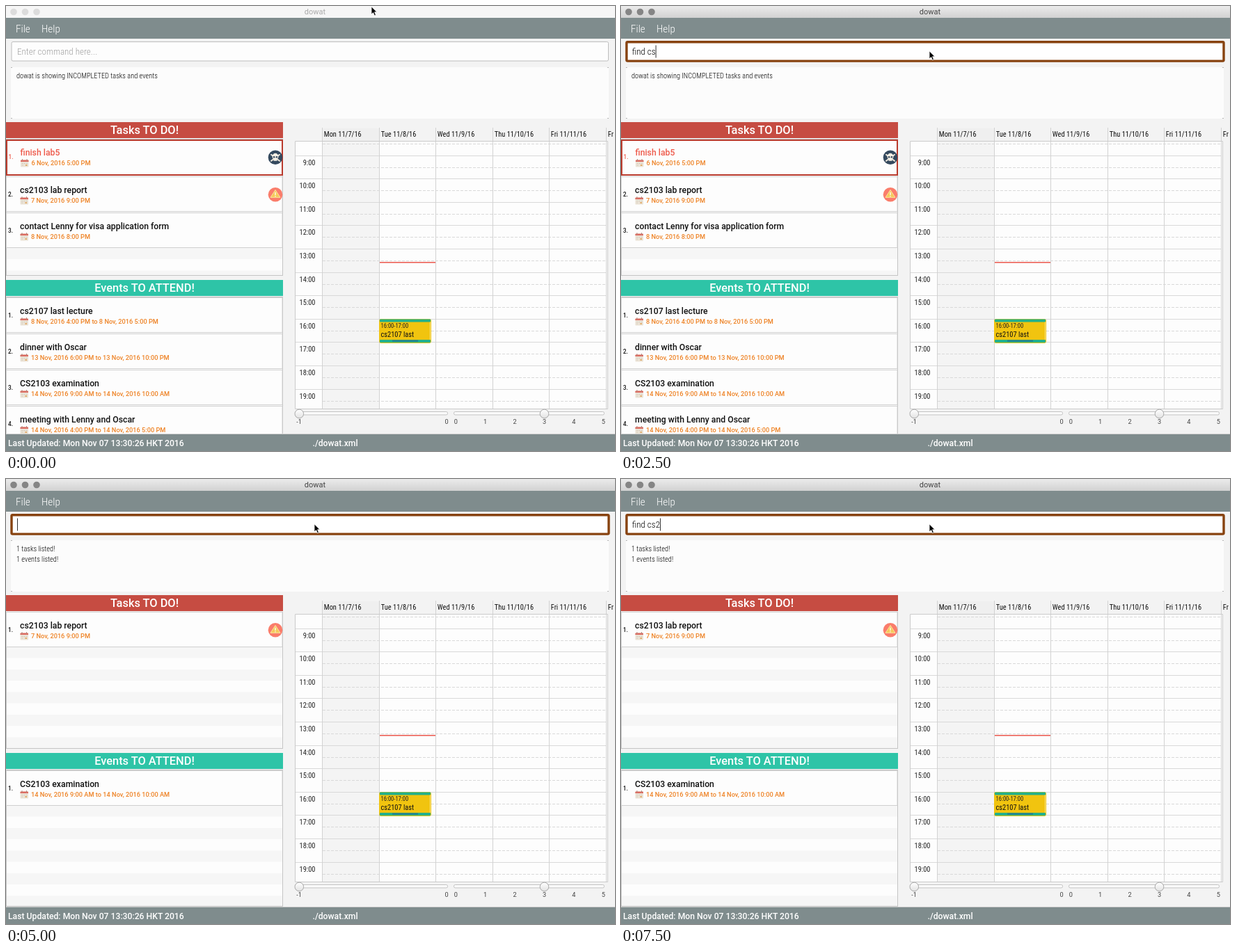
Write an HTML page that moves like this. It is 875 by 640 pixels and loops after 8000 ms.

```html
<!DOCTYPE html>
<html lang="en">
<head>
<meta charset="utf-8">
<title>dowat</title>
<style>
html, body { margin: 0; width: 100%; height: 100%; overflow: hidden; background: #f3f3f3; }
svg { display: block; width: 875px; height: 640px; }
text { font-family: Roboto, "Liberation Sans", sans-serif; white-space: pre; }
.cond, .dark { font-family: "Roboto Condensed", Roboto, "Liberation Sans", sans-serif; font-stretch: 75%; }
.cond { font-weight: 300; }
.med { font-weight: 500; }
</style>
</head>
<body>
<svg id="stage" viewBox="0 0 875 640">
  <defs>
    <linearGradient id="bar" x2="0" y2="1"><stop stop-color="#ebebeb"/><stop offset="1" stop-color="#d2d2d2"/></linearGradient>
    <linearGradient id="knob" x2="0" y2="1"><stop stop-color="#fff"/><stop offset="1" stop-color="#e2e2e2"/></linearGradient>
    <g id="date">
      <rect y="2" width="11.5" height="10" rx="1" fill="#ebe3d6"/>
      <path d="M0 4.5V3q0-1 1-1h9.5q1 0 1 1v1.500z" fill="#dd6a60"/>
      <path d="M2.5 .5v3M9 .5v3" stroke="#b08a80"/>
      <path d="M2 7h1.500M5 7h1.500M8 7h1.500M2 9.500h1.500" stroke="#cfc6b8"/>
      <path d="M7 9.500h2.500" stroke="#e0a860" stroke-width="1.800"/>
    </g>
    <g id="skull">
      <circle r="10.300" fill="#34495e"/>
      <path d="M-6-4 6 5M6-4-6 5" stroke="#eee8dc" stroke-width="2" stroke-linecap="round"/>
      <path d="M-4.500-1a4.500 5 0 0 1 9 0q0 2.500-2 3v3h-5v-3q-2-.5-2-3z" fill="#f3eee3"/>
      <circle cx="-1.900" cy="-.6" r="1.300" fill="#34495e"/><circle cx="1.900" cy="-.6" r="1.300" fill="#34495e"/>
    </g>
    <g id="warn">
      <circle r="10.300" fill="#fa7d6b"/>
      <path d="M0-6.800 7 4H-7z" fill="#f6c95a" stroke="#fbe3a0" stroke-linejoin="round"/>
      <path d="M0-3.500V.6M0 1.800V3" stroke="#fff" stroke-width="1.300"/>
    </g>
  </defs>
</svg>
<script>
const stage = document.getElementById('stage');

function add(tag, attrs, parent = stage, content) {
  const el = document.createElementNS('http://www.w3.org/2000/svg', tag);
  for (const k in attrs) el.setAttribute(k, attrs[k]);
  if (content !== undefined) el.textContent = content;
  parent.appendChild(el);
  return el;
}
const group = () => add('g', {});
const rect = (x, y, width, height, fill, more, parent) =>
  add('rect', { x, y, width, height, fill, ...more }, parent);
const line = (d, stroke, more, parent) => add('path', { d, stroke, fill: 'none', ...more }, parent);
const label = (s, x, y, size, fill, cls = 'med', more, parent) =>
  add('text', { x, y, 'font-size': size, fill, class: cls, ...more }, parent, s);
const mid = { 'text-anchor': 'middle' };
const end = { 'text-anchor': 'end' };
const show = (el, on) => el.setAttribute('visibility', on ? 'visible' : 'hidden');

// Window frame
rect(0, 0, 875, 640, '#f3f3f3');
const bar = rect(0, 0, 875, 17, '#f6f6f6');
const lights = [11, 27.5, 44].map(cx => add('circle', { cx, cy: 8.5, r: 4.8 }));
const title = label('dowat', 444, 12.3, 11, '#aaa', '', mid);
rect(0, 17, 875, 30, '#7f8c8d');
label('File', 14, 38, 15.2, '#fff', 'cond');
label('Help', 51, 38, 15.2, '#fff', 'cond');

// Command box
const idle = group();
rect(8, 51.5, 857.5, 27.5, '#fdfdfd', { rx: 2, stroke: '#bdbdbd' }, idle);
label('Enter command here...', 16, 70, 13.1, '#a0a0a0', 'cond', {}, idle);
const active = group();
rect(8, 51.7, 858, 27.4, '#fff', { rx: 1.5, stroke: '#87420f', 'stroke-width': 3.4 }, active);
const typed = label('', 16, 70, 13.1, '#000', 'cond', {}, active);
const caret = rect(16, 56.5, 1, 18, '#333', {}, active);

// Result box
rect(7, 88, 859, 74, '#fcfcfc');
line('M7 88.5h2M864 88.5h2M7 161.5h2M864 161.5h2', '#b5b5b5');

// Lists
function panel(top, bottom, head, color, name) {
  rect(0, head, 398, top - head - 2, color);
  label(name, 199, head + 17, 16.4, '#fff', 'med', mid);
  rect(.5, top - .5, 397, bottom - top, '#fdfdfd', { stroke: '#c4c4c4' });
}
panel(192, 388, 167, '#c64c42', 'Tasks TO DO!');
panel(419, 615, 394, '#2ec4a7', 'Events TO ATTEND!');

function stripes(parent, from, to) {
  for (let y = from; y < to; y += 32.5)
    rect(1, y, 396, Math.min(16, to - y), '#f6f6f6', {}, parent);
}
function row(parent, y, n, name, when, icon, late) {
  const ink = late ? '#ee5a4b' : '#111';
  const x = late ? .5 : 0;
  if (late) rect(1, y + 1, 396, 50, '#fdfdfd', { stroke: '#b93a2c', 'stroke-width': 2 }, parent);
  else rect(.5, y - .5, 396.5, 50, '#fdfdfd', { stroke: '#d0d0d0' }, parent);
  label(n + '.', 3 + x, y + 28.3, 8.2, ink, 'med', {}, parent);
  label(name, 20 + x, y + 22.7 + x, 12.25, ink, 'med', {}, parent);
  add('use', { href: '#date', x: 20.5 + x, y: y + 27.5 }, parent);
  label(when, 36 + x, y + 36.7 + x, 9.22, '#ee8224', 'med', {}, parent);
  if (icon) add('use', { href: icon, x: 387, y: y + 25.3 + x }, parent);
}

const full = group();
label('dowat is showing INCOMPLETED tasks and events', 15, 103.5, 10.37, '#000', 'cond', {}, full);
stripes(full, 348, 387);
row(full, 192, 1, 'finish lab5', '6 Nov, 2016 5:00 PM', '#skull', true);
row(full, 246, 2, 'cs2103 lab report', '7 Nov, 2016 9:00 PM', '#warn');
row(full, 298, 3, 'contact Lenny for visa application form', '8 Nov, 2016 8:00 PM');
[['cs2107 last lecture', '8 Nov, 2016 4:00 PM to 8 Nov, 2016 5:00 PM'],
 ['dinner with Oscar', '13 Nov, 2016 6:00 PM to 13 Nov, 2016 10:00 PM'],
 ['CS2103 examination', '14 Nov, 2016 9:00 AM to 14 Nov, 2016 10:00 AM'],
 ['meeting with Lenny and Oscar', '14 Nov, 2016 4:00 PM to 14 Nov, 2016 5:00 PM']
].forEach(([name, when], i) => row(full, 420 + i * 52, i + 1, name, when));

const found = group();
label('1 tasks listed!', 15, 103.5, 10.37, '#000', 'cond', {}, found);
label('1 events listed!', 15, 119, 10.37, '#000', 'cond', {}, found);
stripes(found, 241.5, 387);
stripes(found, 469.5, 614);
row(found, 192, 1, 'cs2103 lab report', '7 Nov, 2016 9:00 PM', '#warn');
row(found, 420, 1, 'CS2103 examination', '14 Nov, 2016 9:00 AM to 14 Nov, 2016 10:00 AM');

// Calendar
const col = i => 454.5 + Math.round(i * 81.6);
rect(415, 194, 449, 385, '#fdfdfd');
rect(455, 194, 81, 385, '#f4f4f4');
rect(455, 176, 81, 18, '#efefef');
for (let h = 8; h < 20; h++) {
  const y = Math.round(215.5 + (h - 9) * 33.6) - .5;
  if (h > 8) {
    line(`M415 ${y}H863`, '#d9d9d9');
    label(h + ':00', 444.5, y + 13, 10.4, '#222', 'dark', end);
  }
  line(`M455 ${y + 17}H863`, '#d9d9d9', { 'stroke-dasharray': '4 2' });
}
['Mon 11/7/16', 'Tue 11/8/16', 'Wed 11/9/16', 'Thu 11/10/16', 'Fri 11/11/16', 'Fr'].forEach((day, i) => {
  line(`M${col(i)} 175V579`, '#d2d2d2');
  label(day, col(i) + 2.3, 187.7, 10.4, '#111', 'dark');
});
line('M415.5 194.5H864.5V579.5H415.5z', '#cbcbcb');
rect(537, 368, 80, 1.6, '#ec5f55');
rect(536, 450, 75, 35, '#f1c40f', { rx: 3 });
rect(537, 450.5, 73, 4, '#23b08a', { rx: 1 });
rect(537, 480, 73, 4, '#23b08a', { rx: 1 });
rect(555, 480.5, 37, 2.2, '#2b7f86');
line('M609.5 454.5V480', '#f9e48a');
label('16:00-17:00', 538.5, 463, 8.5, '#222', 'dark');
label('cs2107 last', 538.5, 475.5, 10.4, '#111', 'dark');

// Sliders
function slider(x1, x2, at) {
  rect(x1, 583.5, x2 - x1, 4.5, '#fafafa', { rx: 2, stroke: '#c3c3c3' });
  add('circle', { cx: at, cy: 586.5, r: 6.3, fill: 'url(#knob)', stroke: '#a9a9a9' });
}
slider(416.5, 634.5, 421.3);
slider(643.5, 859.5, 773.5);
[[-1, 421], [0, 633], ...[0, 1, 2, 3, 4, 5].map(n => [n, 646.3 + n * 42.4])]
  .forEach(([n, x]) => label(n, x, 601, 9.2, '#444', '', mid));

// Status bar
rect(0, 616, 875, 24, '#7f8c8d');
line('M0 615.5H875', '#d0d0d0');
label('Last Updated: Mon Nov 07 13:30:26 HKT 2016', 3, 633, 12.2, '#fff');
label('./dowat.xml', 440.5, 633, 12.2, '#fff');

const pointer = add('path', {
  d: 'M0 0V11.2L2.6 8.8 4.4 13 6.4 12.1 4.6 8H8z', fill: '#000', stroke: '#fff', 'stroke-width': .8
});

// [time, command text, caret shown]
const typing = [
  [0, '', 0], [750, '', 1], [1000, '', 0], [1500, '', 1],
  [1750, 'f', 1], [2000, 'fin', 1], [2250, 'find ', 1], [2500, 'find cs', 1],
  [3000, 'find cs2', 1], [3250, 'find cs21', 1], [3500, 'find cs2103', 1],
  [4000, '', 1], [4500, '', 0], [5000, '', 1],
  [5500, 'fi', 1], [5750, 'find', 1], [6000, 'find c', 1], [6250, 'find cs', 1],
  [6750, 'find cs', 0], [7250, 'find cs', 1], [7500, 'find cs2', 1]
];

function draw(t) {
  const awake = t >= 500, focus = t >= 750, done = t >= 4000;
  bar.setAttribute('fill', awake ? 'url(#bar)' : '#f6f6f6');
  title.setAttribute('fill', awake ? '#444' : '#aaa');
  lights.forEach(l => l.setAttribute('fill', awake ? '#858585' : '#dcdcdc'));
  pointer.setAttribute('transform', t < 250 ? 'translate(525 .8)' : 'translate(443 64.8)');
  show(idle, !focus);
  show(active, focus);
  show(full, !done);
  show(found, done);
  const [, text, on] = typing.findLast(s => s[0] <= t);
  if (typed.textContent !== text) typed.textContent = text;
  caret.setAttribute('x', 16 + (text ? typed.getComputedTextLength() : 0));
  show(caret, focus && on);
}

const start = performance.now();
function tick() {
  draw((performance.now() - start) % 8000);
  requestAnimationFrame(tick);
}
draw(0);
requestAnimationFrame(tick);
</script>
</body>
</html>
```
